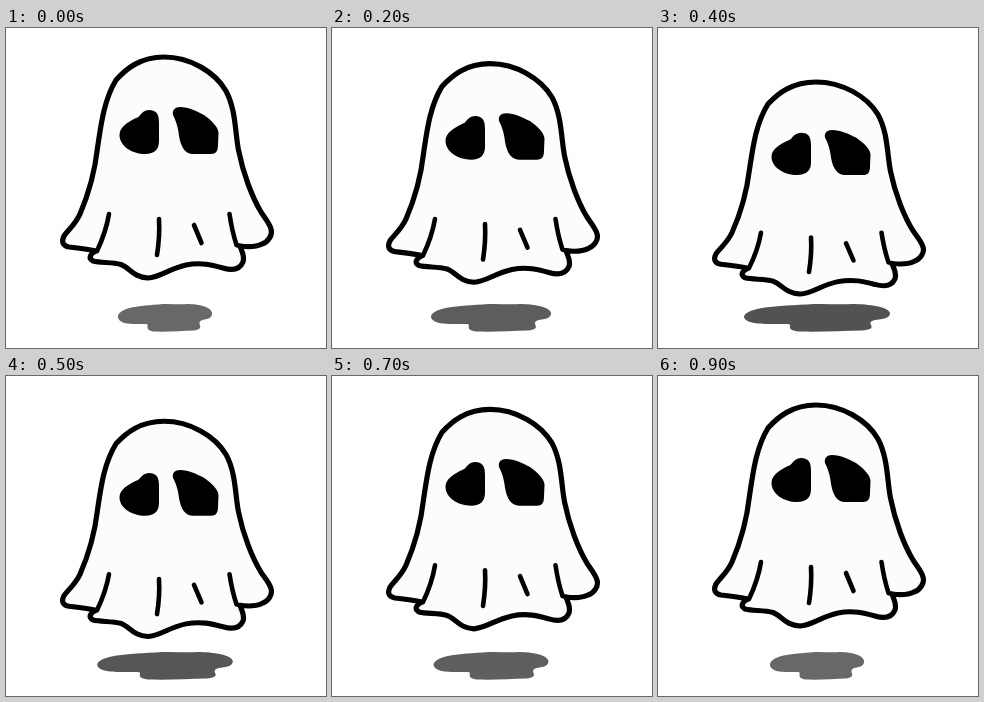
Write an HTML page that moves like this. It is 320 px wide and 320 px high and loops after 1 s.

```html
<!DOCTYPE html>
<html lang="en">
<head>
<meta charset="utf-8">
<title>Floating ghost</title>
<style>
html, body { margin: 0; height: 100%; overflow: hidden; background: #fff; }
svg { display: block; width: 100vw; height: 100vh; }
.line { fill: none; stroke: #000; stroke-width: 4.6; stroke-linecap: round; stroke-linejoin: round; }
.sheet { fill: #fcfcfc; stroke-width: 5.2; }
</style>
</head>
<body>
<svg viewBox="0 0 320 320">
  <path id="shadow" d="M-73 289C-72 281-50 278-10 276.500C5 275 20 277 35 276C52 276 72 279 73 285
    C73 289 69 291 58 292C53 293 53 295 54 297C56 300 53 302 45 302.500C25 303 5 304-18 303.500
    C-25 303-28 301-27 298C-26 296-29 296-34 296C-50 296-71 297-73 289Z"/>
  <g id="ghost">
    <path class="line sheet" d="M158 29C134 29 120 41 110 52C98 72 95 96 91.500 120C89 142 83 165 74 186
      C69 197 62 202 58 208C55 214 57 218 63 219C72 220 81 221 90 223C84 226 82 230 87 233
      C95 235 106 234 115 236.500C124 240 127 249 142 250C155 249 162 241 180 237C195 234 206 237 217 240
      C227 243 234 241 237 234C239 228 236 224 234 218C242 219 250 219 256 216C262 214 267 207 265 201
      C264 196 259 190 255 184C246 169 237 145 232.500 122C229 104 230 82 220 63C209 44 184 29 158 29Z"/>
    <path class="line" d="M103 186Q100 204 91 223M153 191Q154 208 151 227M188 197L195.500 215M223.500 186Q226 203 230.500 217L234 218"/>
    <path d="M113.500 107C113.500 99 122 94 130 90C135 89 134 83 143 82C151 82 153 87 153 95L153 113
      C153 121 149 126 139 126C126 126 113.500 118 113.500 107Z"/>
    <path d="M167 87C166 82 169 79 174 79C183 79 190 83 198 87C205 92 212.500 99 212.500 105L212 117
      C212 123 210 126 205 126L187 126C179 126 175 119 173 108C172 99 170 93 167 87Z"/>
  </g>
</svg>
<script>
const ghost = document.getElementById('ghost');
const shadow = document.getElementById('shadow');
const TOP = 27, STEP = 50, LOW = 400, REST = 900;

function draw() {
  const t = Math.floor(performance.now() % 1000 / STEP) * STEP;
  const near = t < LOW ? t / LOW : Math.max(0, (REST - t) / (REST - LOW));
  // The body falls with acceleration and squashes slightly near the ground
  const fall = near ** 1.9;
  const squash = 1 - 0.04 * fall;
  ghost.setAttribute('transform', `translate(0 ${TOP + 25 * fall}) scale(1 ${squash}) translate(0 ${-TOP})`);
  shadow.setAttribute('transform', `translate(159 0) scale(${0.645 + 0.355 * near} 1)`);
  const grey = Math.round(104 - 22 * near);
  shadow.setAttribute('fill', `rgb(${grey},${grey},${grey})`);
  requestAnimationFrame(draw);
}
draw();
</script>
</body>
</html>
```
